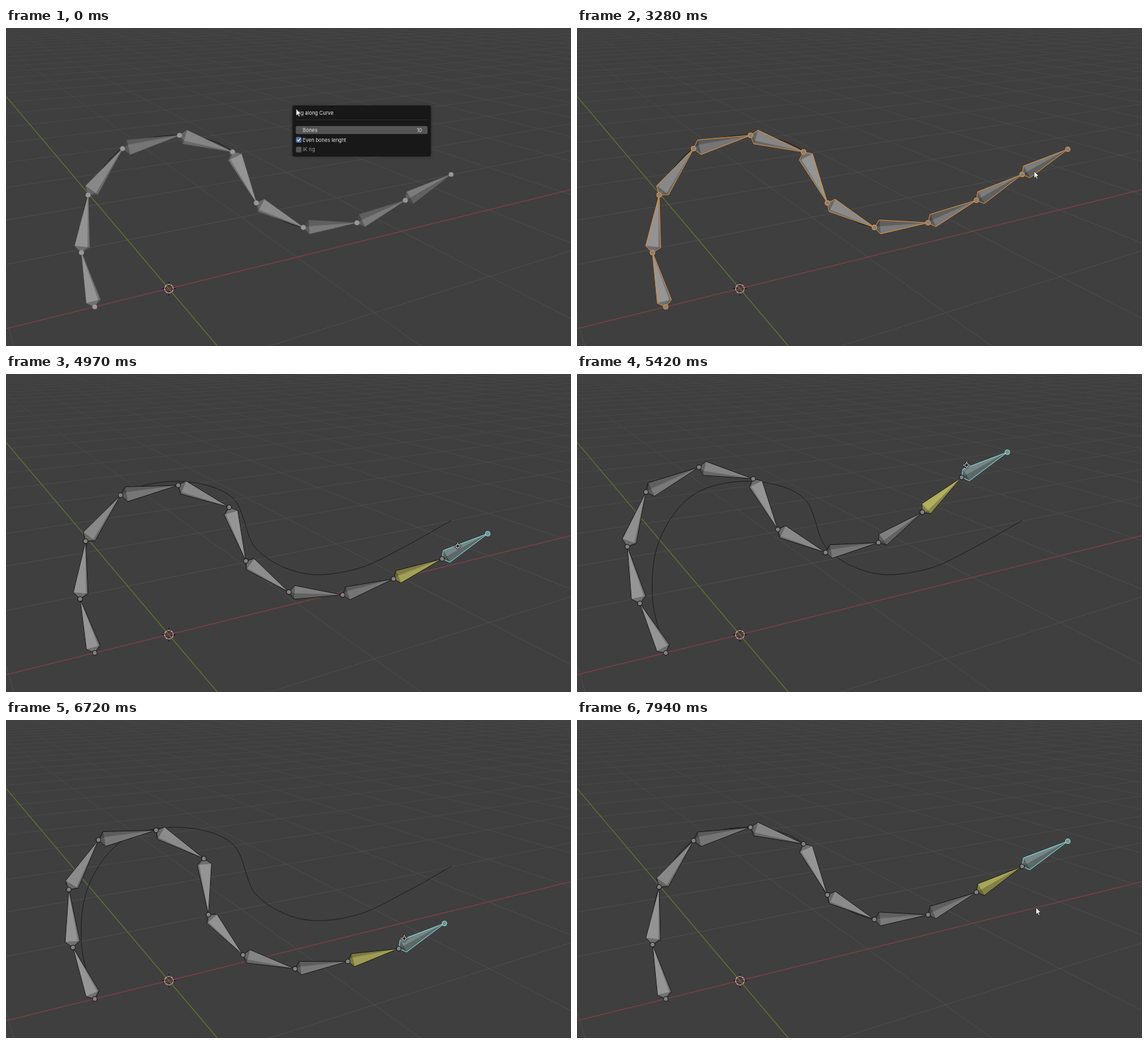
An HTML page with a canvas that plays this animation: 853x480 px, repeating every 8000 ms.

```html
<!DOCTYPE html>
<html lang="en">
<head>
<meta charset="utf-8">
<title>Rig along Curve</title>
<style>
html, body { margin: 0; height: 100%; overflow: hidden; background: #3f3f3f; }
canvas { display: block; }
</style>
</head>
<body>
<canvas id="stage" width="853" height="480"></canvas>
<script>
const ctx = document.getElementById('stage').getContext('2d');
const W = 853, H = 480, LOOP = 8000, RATE = 14;
const FONT = '7.5px Inter, "Noto Sans", sans-serif';

// ---- timeline, in ticks of 1/14 s ----
const TICK = { ikOn: 17, panelOff: 29, select: 36, pose: 47, grab: 53, release: 106 };

// Turning points [tick, value]; every stretch between two is a cosine ease
const tipTurns = {
  x: [[52, 741], [63, 554], [71.8, 779], [80, 530], [81.4, 530], [88.8, 832], [97.3, 579], [105, 666]],
  y: [[52, 183], [63, 286], [64, 286], [79.5, 95], [82.5, 95], [94.5, 308], [105, 270]]
};
const arrowTurns = {
  x: [[6, 438], [14, 443], [24, 443], [27, 674], [32, 690], [53, 690], [54, 613], [107, 613], [111, 693]],
  y: [[6, 122], [14, 185], [24, 185], [27, 222], [32, 216], [53, 216], [54, 292], [107, 292], [111, 283]]
};

function swing(turns, t) {
  const next = turns.findIndex(k => k[0] > t);
  if (next === 0) return turns[0][1];
  if (next < 0) return turns[turns.length - 1][1];
  const [t0, a] = turns[next - 1], [t1, b] = turns[next];
  return a + (b - a) * (1 - Math.cos(Math.PI * (t - t0) / (t1 - t0))) / 2;
}
const at = (turns, t) => [swing(turns.x, t), swing(turns.y, t)];

// ---- armature ----
const rest = [
  [134, 421], [114, 339], [124, 252], [176, 182], [262, 162], [342, 187],
  [378, 264], [449, 301], [530, 294], [603, 260], [672, 221]
];
const restTip = [741, 183], handle = [69, -38], END = 10;
const span = (a, b) => [b[0] - a[0], b[1] - a[1]];
const links = rest.slice(1).map((p, i) => span(rest[i], p));
const lens = links.map(([x, y]) => Math.hypot(x, y));
const restAngles = links.map(([x, y]) => Math.atan2(y, x));
const looseness = i => 1 + .4 * .4 ** i;

function forward(angles) {
  const pts = [rest[0]];
  angles.forEach((a, i) => pts.push([
    pts[i][0] + lens[i] * Math.cos(a), pts[i][1] + lens[i] * Math.sin(a)]));
  return pts;
}

// Least-change inverse kinematics: damped pseudo-inverse steps from rest
function armature(tip) {
  const goal = [tip[0] - handle[0], tip[1] - handle[1]];
  const angles = restAngles.slice();
  let pts = forward(angles);
  for (let n = 0; n < 40; n++) {
    let [ex, ey] = span(pts[END], goal);
    const dist = Math.hypot(ex, ey);
    if (dist < .05) break;
    const k = Math.min(1, 14 / dist);
    ex *= k;
    ey *= k;
    const cols = pts.slice(0, END).map(p => [p[1] - pts[END][1], pts[END][0] - p[0]]);
    let a = 50, b = 0, c = 50;
    cols.forEach(([x, y], i) => {
      const w = looseness(i);
      a += w * x * x;
      b += w * x * y;
      c += w * y * y;
    });
    const det = a * c - b * b;
    const lx = (c * ex - b * ey) / det, ly = (a * ey - b * ex) / det;
    let turn = 0;
    cols.forEach(([x, y], i) => {
      turn += looseness(i) * (x * lx + y * ly);
      angles[i] += turn;
    });
    pts = forward(angles);
  }
  return [...pts, tip];
}

// ---- drawing helpers ----
function poly(pts, fill, stroke, width = 1) {
  ctx.beginPath();
  pts.forEach(p => ctx.lineTo(p[0], p[1]));
  ctx.closePath();
  paint(fill, stroke, width);
}
function paint(fill, stroke, width) {
  if (fill) { ctx.fillStyle = fill; ctx.fill(); }
  if (stroke) { ctx.strokeStyle = stroke; ctx.lineWidth = width; ctx.stroke(); }
}
function line(x1, y1, x2, y2, color, width = 1) {
  ctx.beginPath();
  ctx.moveTo(x1, y1);
  ctx.lineTo(x2, y2);
  paint(null, color, width);
}
function disc(x, y, r, fill, stroke, width = 1) {
  ctx.beginPath();
  ctx.arc(x, y, r, 0, Math.PI * 2);
  paint(fill, stroke, width);
}
function box(x, y, w, h, r, fill) {
  ctx.beginPath();
  ctx.roundRect(x, y, w, h, r);
  paint(fill);
}
function label(text, x, y, color, align = 'left') {
  ctx.font = FONT;
  ctx.textAlign = align;
  ctx.fillStyle = color;
  ctx.fillText(text, x, y);
}
const tone = (base, f) => `rgb(${base.map(v => Math.round(v * f)).join()})`;

// ---- scene ----
const HORIZON = -80, VX = 2169, VY = -155;
const gridInk = ctx.createLinearGradient(0, 0, 0, 300);
gridInk.addColorStop(0, '#444');
gridInk.addColorStop(1, '#4c4c4c');

function alongX(n, color, width) {
  line(0, HORIZON + 1 / (.001873 + .000415 * n), VX, HORIZON, color, width);
}
function alongY(m, color, width) {
  line(319 + 307 * m, H, VY, HORIZON, color, width);
}
function ground() {
  ctx.fillStyle = '#3f3f3f';
  ctx.fillRect(0, 0, W, H);
  for (let n = -1; n < 27; n++) alongX(n, gridInk);
  for (let m = -1; m < 23; m++) alongY(m, gridInk);
  alongX(0, '#823c43', 1.1);
  alongY(0, '#5d772f', 1.2);
}

// The guide curve runs smoothly through the resting joints
function curve() {
  const p = i => rest[Math.max(0, Math.min(END, i))];
  ctx.beginPath();
  ctx.moveTo(...rest[0]);
  for (let i = 0; i < END; i++) {
    const [ax, ay] = span(p(i - 1), p(i + 1)), [bx, by] = span(p(i), p(i + 2));
    const [x0, y0] = p(i), [x1, y1] = p(i + 1);
    ctx.bezierCurveTo(x0 + ax / 6, y0 + ay / 6, x1 - bx / 6, y1 - by / 6, x1, y1);
  }
  paint(null, '#1a1a1a', .9);
}

const sides = [[1, 0], [0, 1], [-1, 0], [0, -1]];
function pivot(x, y) {
  for (const [dx, dy] of sides)
    line(x + dx * 4, y + dy * 4, x + dx * 10.5, y + dy * 10.5, '#141414');
  disc(x, y, 6.5, null, '#dcdcdc', 1.1);
  ctx.setLineDash([2.55, 2.55]);
  disc(x, y, 6.5, null, '#c0343b', 1.1);
  ctx.setLineDash([]);
}

// Bones rising gently to the right face away from the light
function bone(a, b, base, outline) {
  const [dx, dy] = span(a, b);
  const place = (along, side) => [
    a[0] + dx * along + dy * side, a[1] + dy * along - dx * side];
  const steep = Math.abs(Math.sin(Math.atan2(-dy, dx) - .26));
  const w = .128, ridge = place(.1, w * Math.max(-.75, .4 - 1.8 * steep));
  const left = place(.1, w), right = place(.1, -w);
  const light = .76 + .22 * steep, dark = light * .78;
  const [l, r] = steep > .22 ? [light, dark] : [dark, light];
  const face = (pts, f) => poly(pts, tone(base, f), tone(base, f), .5);
  face([left, ridge, b], l);
  face([right, ridge, b], r);
  face([left, ridge, a], l * .75);
  face([right, ridge, a], r * .75);
  if (outline) poly([a, left, b, right], null, outline, 1);
}

function joint(p, base, outline) {
  disc(...p, 3.6, tone(base, outline ? .85 : 1), outline);
}

const GREY = [152, 152, 152], YELLOW = [206, 203, 110], TEAL = [146, 166, 166];
function rig(pts, tick) {
  const posing = tick >= TICK.pose;
  const count = tick >= TICK.ikOn ? END + 1 : END;
  const ink = posing ? '#161616' : tick >= TICK.select ? '#e08f3c' : null;
  ctx.lineJoin = 'round';
  for (let i = 0; i < count; i++) {
    const active = posing && i === END;
    const base = active ? TEAL : posing && i === END - 1 ? YELLOW : GREY;
    const outline = active ? '#83e6e4' : ink;
    bone(pts[i], pts[i + 1], base, outline);
    joint(pts[i], GREY, ink);
    joint(pts[i + 1], active ? TEAL : GREY, outline);
  }
}

function tickBox(x, y, on) {
  box(x, y, 8.5, 8.5, 1.5, on ? '#4f6f9f' : '#545454');
  if (!on) return;
  ctx.beginPath();
  ctx.moveTo(x + 1.8, y + 4.4);
  ctx.lineTo(x + 3.6, y + 6.3);
  ctx.lineTo(x + 6.8, y + 2.2);
  paint(null, '#fff', 1.1);
}

function panel(tick, pointer) {
  const ik = tick >= TICK.ikOn;
  const hover = pointer[1] > 147 && pointer[1] < 161;
  ctx.shadowColor = 'rgba(0,0,0,.35)';
  ctx.shadowBlur = 4;
  box(432.5, 117, 209, 77, 3, '#181818');
  ctx.shadowBlur = 0;
  ctx.shadowColor = 'transparent';
  label('Rig along Curve', 438, 130.8, '#f0f0f0');
  line(438, 138.5, 637, 138.5, '#2b2b2b');
  box(437.5, 148, 199, 12, 2, hover ? '#656565' : '#545454');
  label('Bones', 448, 156.8, '#e2e2e2');
  label('10', 628, 156.8, '#e2e2e2', 'right');
  tickBox(437.7, 164.5, true);
  label('Even bones lenght', 448, 171.5, '#e6e6e6');
  tickBox(437.7, 179.2, ik);
  label('IK rig', 448, 186.2, ik ? '#e6e6e6' : '#999');
}

function arrow([x, y]) {
  const shape = [[0, 0], [0, 10.5], [2.4, 8.4], [4.1, 12], [5.7, 11.2], [4.1, 7.7], [7.2, 7.4]];
  poly(shape.map(p => [x + p[0], y + p[1]]), '#fff', '#222', .8);
}

function moveCursor([x, y]) {
  for (const [dx, dy] of sides) {
    const corner = (f, s) => [x + dx * f - dy * s, y + dy * f + dx * s];
    poly([corner(6, 0), corner(3.4, 2.3), corner(3.4, -2.3)], '#f2f2f2', '#111', .9);
  }
  disc(x, y, 2.6, '#222', '#f2f2f2', .9);
  disc(x, y, 1, '#111');
}

// The pointer runs slightly ahead of the bone it drags
function grabPoint(tick) {
  const [x, y] = at(tipTurns, tick);
  const [vx, vy] = span(at(tipTurns, tick - .5), at(tipTurns, tick + .5));
  return [x - 52 + .2 * vx, y + 22 + .2 * vy];
}

function draw(ms) {
  const tick = Math.floor(ms * RATE / 1000 + .25);
  const grabbing = tick >= TICK.grab && tick < TICK.release;
  const pointer = at(arrowTurns, tick);
  ground();
  curve();
  pivot(246, 393.5);
  rig(armature(grabbing ? at(tipTurns, tick) : restTip), tick);
  if (tick < TICK.panelOff) panel(tick, pointer);
  if (grabbing) moveCursor(grabPoint(tick));
  else arrow(pointer);
}

const start = performance.now();
function loop() {
  draw((performance.now() - start) % LOOP);
  requestAnimationFrame(loop);
}
loop();
</script>
</body>
</html>
```
